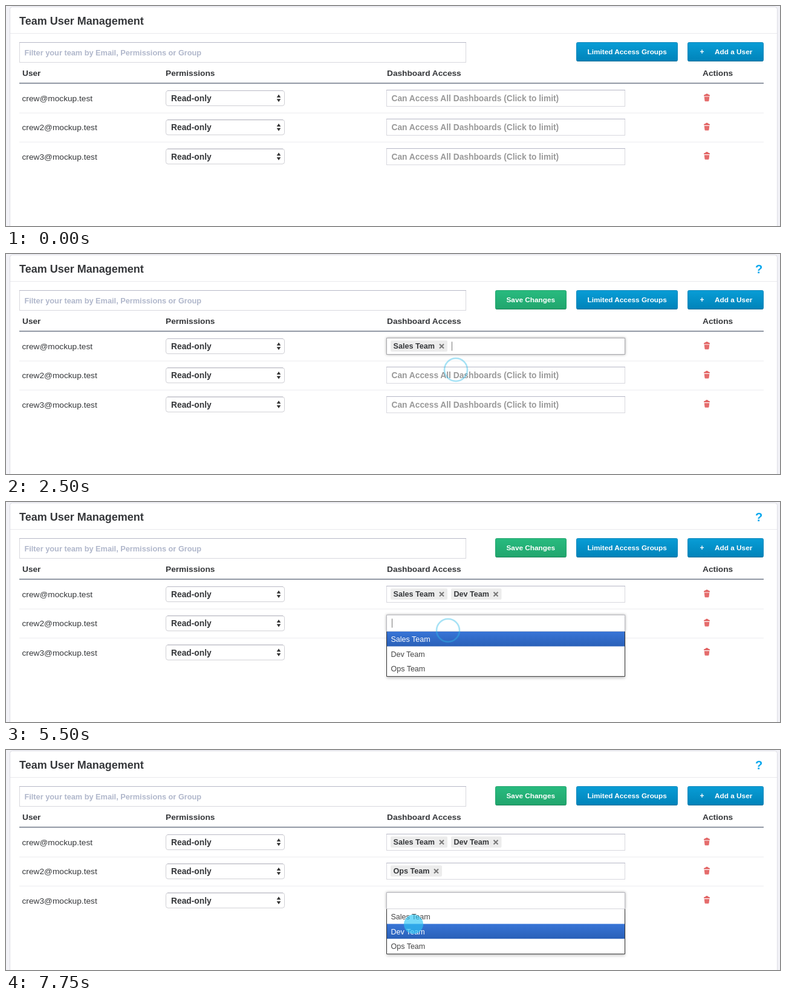
An HTML page for the animation above (8 s loop, 1280 by 365 pixels).

```html
<!DOCTYPE html>
<html lang="en">
<head>
<meta charset="utf-8">
<title>Team User Management</title>
<style>
html, body { margin: 0; width: 100%; height: 100%; overflow: hidden; background: #f2f2f7; }
svg { display: block; width: 1280px; height: 365px; }
text { font-family: "Liberation Sans", Arial, sans-serif; fill: #35373a; }
.b { font-weight: bold; }
</style>
</head>
<body>
<svg viewBox="0 0 1280 365">
  <defs>
    <linearGradient id="blue" x2="0" y2="1"><stop stop-color="#089dd6"/><stop offset="1" stop-color="#0083b9"/></linearGradient>
    <linearGradient id="green" x2="0" y2="1"><stop stop-color="#28bb7f"/><stop offset="1" stop-color="#21a56d"/></linearGradient>
    <linearGradient id="pick" x2="0" y2="1"><stop stop-color="#3875d7"/><stop offset="1" stop-color="#2a60b8"/></linearGradient>
    <filter id="glow" x="-5%" y="-40%" width="110%" height="180%"><feGaussianBlur stdDeviation="2"/></filter>
  </defs>
  <g id="base"></g>
  <g id="live"></g>
  <g id="pointer"></g>
</svg>
<script>
const LOOP = 8000, STEP = 250, ROW = 48.3;
const FIELD = { x: 629.5, y: 139.5, w: 394, h: 27 };
const ITEM = 24.7;
const TEAMS = ['Sales Team', 'Dev Team', 'Ops Team'];
const TAG_WIDTH = [94, 83.5, 85];
const USERS = ['crew@mockup.test', 'crew2@mockup.test', 'crew3@mockup.test'];
const $ = id => document.getElementById(id);

// tags: chosen teams per row; pick: highlighted item while the list is open
const SCENES = [
  { at: 0, tags: [[], [], []] },
  { at: 1750, row: 0, pick: 0, tags: [[], [], []] },
  { at: 2250, row: 0, tags: [[0], [], []] },
  { at: 4000, row: 0, pick: 1, tags: [[0], [], []] },
  { at: 5000, row: 0, tags: [[0, 1], [], []] },
  { at: 5250, row: 1, pick: 0, tags: [[0, 1], [], []] },
  { at: 5750, row: 1, pick: 1, tags: [[0, 1], [], []], caretAt: 5250 },
  { at: 6000, row: 1, pick: 2, tags: [[0, 1], [], []], caretAt: 5250 },
  { at: 6250, row: 1, tags: [[0, 1], [2], []] },
  { at: 7250, row: 2, pick: 0, tags: [[0, 1], [2], []] },
  { at: 7750, row: 2, pick: 1, tags: [[0, 1], [2], []], caretAt: 7250 }
];

// time, x, y of the pointer
const PATH = [
  [250, 831, 111], [1250, 783, 172], [1500, 772, 164], [2250, 745, 184], [2500, 744, 192],
  [3250, 749, 140], [3750, 749, 160], [4750, 754, 210], [5250, 735, 206], [5500, 731, 213],
  [6250, 690, 278], [7000, 679, 261], [7250, 676, 257], [7750, 674, 289]
];
const CLICKS = [1500, 2250, 3750, 5000, 5250, 6250, 7250, 7750];

const text = (s, x, y, size, extra = '') =>
  `<text x="${x}" y="${y}" font-size="${size}" ${extra}>${s}</text>`;
const bold = (s, x, y, size, extra = '') => text(s, x, y, size, 'class="b" ' + extra);
const rect = (x, y, w, h, fill, extra = '') =>
  `<rect x="${x}" y="${y}" width="${w}" height="${h}" fill="${fill}" ${extra}/>`;
const path = (d, extra) => `<path d="${d}" ${extra}/>`;

function input(x, y, w, h) {
  return rect(x, y, w, h, '#fff', 'stroke="#d8d8de"') +
    path(`M${x - .5} ${y}h${w + 1}`, 'stroke="#b6b7c6"');
}

function button(label, x, w, paint, edge, labelX) {
  return rect(x + .5, 60.5, w - 1, 31, `url(#${paint})`, `rx="2" stroke="${edge}"`) +
    path(`M${x + 1} 91.5h${w - 2}`, 'stroke="#00000030"') +
    bold(label, labelX, 80, 11.8, 'style="fill:#fff"');
}

function userRow(i) {
  const trash = path('M1154 148.5q0-1.6 3-1.9q0-1.1 2-1.1t2 1.1q3 .3 3 1.9v1h-10z', 'fill="#e26363"') +
    path('M1154.7 150.6h8.6l-.8 6.6q-.1 1-1.2 1h-4.6q-1.1 0-1.2-1z', 'fill="#e56c6c"');
  return `<g transform="translate(0 ${i * ROW})">` +
    text(USERS[i], 26.5, 158, 13.7) +
    rect(264.5, 140.5, 196, 25, '#fff', 'rx="3.5" stroke="#cfcfd4"') +
    path('M267 140.5h191', 'stroke="#b9b9c4"') +
    bold('Read-only', 273, 158, 13.8) +
    path('M447.7 151.7l3.3-5 3.3 5zM447.7 154.3l3.3 5 3.3-5z', 'fill="#333"') +
    trash +
    (i < 2 ? path('M22 177.5H1253', 'stroke="#ececef"') : '') + '</g>';
}

function drawBase() {
  $('base').innerHTML =
    rect(6.5, 1.5, 1269, 380, '#fff', 'rx="4" stroke="#dddde4"') +
    bold('Team User Management', 22, 31, 18) +
    path('M7 45.5H1275', 'stroke="#e9e9ed"') +
    input(22.5, 60.5, 738, 33) +
    bold('Filter your team by Email, Permissions or Group', 30.5, 82, 12.75, 'style="fill:#b0b7cb"') +
    button('Limited Access Groups', 943, 168, 'blue', '#0b86ba', 961.5) +
    button('Add a User', 1127, 126, 'blue', '#0b86ba', 1172) +
    bold('+', 1147.5, 80, 12, 'style="fill:#fff"') +
    [['User', 27], ['Permissions', 264], ['Dashboard Access', 630], ['Actions', 1152]]
      .map(([s, x]) => bold(s, x, 115.5, 13.7)).join('') +
    path('M22 128.2H1253', 'stroke="#838b99" stroke-width="1.8"') +
    USERS.map((_, i) => userRow(i)).join('');
}

function tagsIn(list) {
  let x = 636, out = '';
  for (const team of list) {
    const w = TAG_WIDTH[team], cross = x + w - 9.5;
    out += rect(x, 143.5, w, 18.5, '#ececec', 'rx="2"') +
      bold(TEAMS[team], x + 4.5, 157, 12.6) +
      path(`M${cross - 3.5} 149.5l7 7m0-7l-7 7`, 'stroke="#777" stroke-width="2"');
    x += w + 6;
  }
  return { out, end: x };
}

function dropdown(scene) {
  const top = FIELD.y + FIELD.h, h = ITEM * 3 + .8;
  const items = TEAMS.map((name, i) => {
    const used = scene.tags[scene.row].includes(i), on = i === scene.pick;
    const color = on ? '#fff' : used ? '#c9c9c9' : '#444';
    const y = top + .3 + i * ITEM;
    return (on ? rect(FIELD.x + .5, y, FIELD.w - 1, ITEM, 'url(#pick)') : '') +
      text(name, 636.5, y + 17, 12.5, `style="fill:${color}"`);
  }).join('');
  return rect(FIELD.x, top + 4, FIELD.w, h - 1, '#00000038', 'filter="url(#glow)"') +
    rect(FIELD.x, top, FIELD.w, h, '#fff') + items +
    path(`M${FIELD.x} ${top}v${h}h${FIELD.w}v${-h}`, 'fill="none" stroke="#333"') +
    path(`M${FIELD.x} ${top}h${FIELD.w}`, 'stroke="#d4d4da"');
}

function field(scene, i, t) {
  const { x, y, w, h } = FIELD, focused = scene.row === i, open = focused && scene.pick !== undefined;
  const tags = tagsIn(scene.tags[i]);
  let out = focused ? rect(x - .5, y - .5, w + 1, h + 1, '#00000058', 'filter="url(#glow)"') : '';
  out += input(x, y, w, h);
  if (focused) out += rect(x, y, w, h, 'none', `stroke="${open ? '#b9b9c0' : '#aaaaae'}"`);
  out += tags.out;
  if (!focused && !scene.tags[i].length)
    out += bold('Can Access All Dashboards (Click to limit)', 637.5, 158, 13.78, 'style="fill:#999"');
  const since = t - (scene.caretAt ?? scene.at);
  if (focused && since % 1000 < 500) {
    const caretX = scene.tags[i].length ? tags.end + 1.5 : 638.5;
    out += path(`M${caretX} 145.5v15`, 'stroke="#777"');
  }
  if (open) out += dropdown(scene);
  return `<g transform="translate(0 ${Math.round(i * ROW)})">${out}</g>`;
}

function pointerAt(t) {
  const n = PATH.findIndex(p => p[0] >= t);
  if (n < 1) return PATH[0].slice(1);
  const [a, b] = [PATH[n - 1], PATH[n]], k = (t - a[0]) / (b[0] - a[0]);
  return [1, 2].map(j => a[j] + (b[j] - a[j]) * k);
}

function drawPointer(t) {
  if (t < 250) return '';
  const [x, y] = pointerAt(t), at = `cx="${x}" cy="${y}"`;
  if (CLICKS.includes(t)) return `<circle ${at} r="16" fill="#2cc4f5" opacity=".65"/>`;
  const fade = t <= 1250 ? .17 : .42;
  const r = t <= 1250 ? 20.5 : 19;
  return `<circle ${at} r="${r}" fill="none" stroke="#2fb9e6" stroke-width="2.6" opacity="${fade}"/>`;
}

function draw(t) {
  const scene = SCENES.filter(s => s.at <= t).pop();
  const order = [0, 1, 2].sort((a, b) => (a === scene.row) - (b === scene.row));
  const changed = scene.tags[0].length > 0;
  $('live').innerHTML =
    (changed ? button('Save Changes', 809, 118, 'green', '#23a36d', 827.5) +
      bold('?', 1245, 31.5, 20, 'text-anchor="middle" style="fill:#0ba8ee"') : '') +
    order.map(i => field(scene, i, t)).join('');
  $('pointer').innerHTML = drawPointer(t);
}

let shown = -1;
const start = performance.now();
function tick() {
  const t = Math.floor((performance.now() - start) % LOOP / STEP) * STEP;
  if (t !== shown) draw(shown = t);
  requestAnimationFrame(tick);
}
drawBase();
tick();
</script>
</body>
</html>
```
